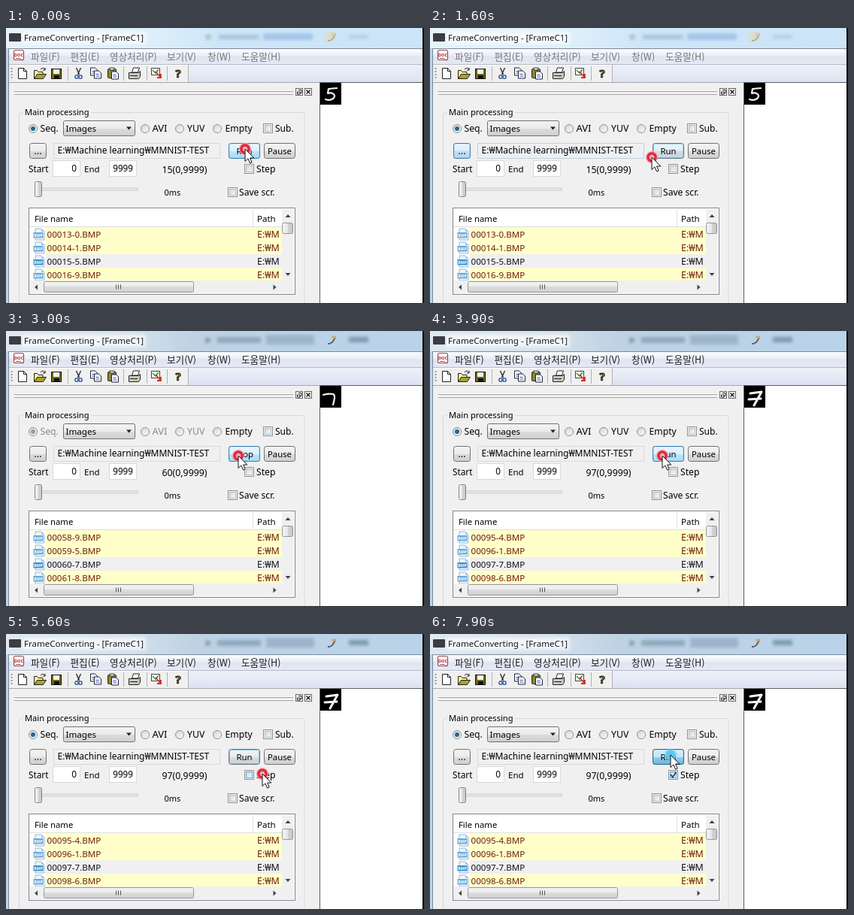
These frames come from a looping animation (556x366 px, 8000 ms). An HTML page:

```html
<!DOCTYPE html>
<html lang="ko">
<head>
<meta charset="utf-8">
<title>Frame viewer</title>
<style>
html, body { margin: 0; width: 100%; height: 100%; overflow: hidden; background: #f0f0f0; }
svg { display: block; width: 556px; height: 366px; }
text { font-family: "Noto Sans", "Open Sans", sans-serif; white-space: pre; }
.menu text { font-family: "Noto Sans CJK KR", "Noto Sans CJK", sans-serif; font-size: 12.6px; }
</style>
</head>
<body>
<svg id="stage" viewBox="0 0 556 366" xmlns="http://www.w3.org/2000/svg"></svg>
<script>
const LOOP = 8000, STEP = 100, RUN_START = 2000, RUN_END = 3800, FIRST = 15, LAST = 97;

// Class of each sample, in file order
const labels = '7210414959069015973496654074013134727121174235124463556041957893746430702917329776278473613693141769';

// Handwritten digits inside a 28 x 28 cell
const digitPaths = [
  'M15 6C6 6 5 22 13 22S23 6 14 6',
  'M16 6L12 22',
  'M8 9C11 4 20 6 17 12L8 21Q13 17 21 21',
  'M8 8C14 4 20 7 17 11L12 13C21 13 20 22 9 21',
  'M9 7L8 14Q14 16 19 12M19 6L17 23',
  'M22 6L11 7L10 13C17 11 22 16 17 20Q13 23 7 21',
  'M16 5C8 10 7 22 13 22S19 14 9 17',
  'M4 11Q11 9 17 10Q21 11 17 24',
  'M18 8C11 3 7 9 13 13S17 23 12 22S12 16 19 8',
  'M19 9C13 4 6 12 11 14S18 12 19 8L16 23'
];
const crossedSeven = 'M8 9L23 7L13 25M6 17L22 16';

// Pointer route: time, x, y
const route = [
  [0, 318, 161], [1000, 318, 161], [1350, 46, 167], [1600, 295, 172], [1900, 309, 166],
  [4600, 309, 166], [5000, 328, 178], [5400, 341, 186], [6000, 341, 186], [6200, 352, 169],
  [6400, 352, 169], [6600, 341, 180], [6900, 326, 187], [7300, 326, 187], [7700, 320, 161], [8000, 320, 161]
];
const clicks = [[1900, 2000], [3700, 3800], [7000, 7200], [7800, 8000]];
const hovers = {
  run: [[-500, 1050], [1750, 4800], [7500, 9000]],
  dots: [[1280, 1420]],
  path: [[1120, 1280], [1420, 1580]],
  pause: [[6100, 6500]],
  step: [[5200, 6100], [6500, 7450]]
};

const rect = (x, y, w, h, fill, extra = '') =>
  `<rect x="${x}" y="${y}" width="${w}" height="${h}" fill="${fill}" ${extra}/>`;
const line = (d, color, width = 1, extra = '') =>
  `<path d="${d}" fill="none" stroke="${color}" stroke-width="${width}" ${extra}/>`;
const shape = (d, fill, extra = '') => `<path d="${d}" fill="${fill}" ${extra}/>`;
const text = (x, y, s, size = 11.5, extra = '') =>
  `<text x="${x}" y="${y}" font-size="${size}" ${extra}>${s}</text>`;
const stopTags = stops => stops.map(([o, c, a = 1]) => `<stop offset="${o}" stop-color="${c}" stop-opacity="${a}"/>`).join('');
const gradient = (id, stops, dir = 'x2="0" y2="1"') =>
  `<linearGradient id="${id}" ${dir}>${stopTags(stops)}</linearGradient>`;
const radial = (id, stops) => `<radialGradient id="${id}">${stopTags(stops)}</radialGradient>`;

const button = (id, x, w, label, size) => `
  ${rect(x + .5, 153.5, w - 1, 20, 'url(#face)', 'rx="3" stroke="#707070"')}
  ${rect(x + .5, 153.5, w - 1, 20, 'url(#hot)', `id="${id}Glow" rx="3" stroke="#3c7fb1"`)}
  ${rect(x + 1.5, 154.5, w - 3, 18, 'none', `id="${id}Ring" rx="2" stroke="#6cc4e8"`)}
  ${text(x + w / 2, 168, label, size, `id="${id}Label" text-anchor="middle"`)}`;

const radio = (x, id, on) => `
  <circle cx="${x}" cy="134" r="5.5" fill="url(#bulb)" stroke="#8e8f8f"/>
  ${on ? `<circle id="${id}" cx="${x}" cy="134" r="3" fill="#1c6a9c"/>` : ''}`;

const checkbox = (x, y, id = 'box' + x) => `
  ${rect(x + .5, y + .5, 12, 12, '#f6f6f6', 'stroke="#8e8f8f"')}
  ${rect(x + 2.5, y + 2.5, 8, 8, 'url(#bulb)', `id="${id}" stroke="#b6bcc2"`)}`;

const field = (x, y, w, h, fill) => rect(x + .5, y + .5, w - 1, h - 1, fill, 'stroke="#d5d9de"');

const fileRow = n => {
  const y = 265 + n * 18, current = n === 2;
  return `${rect(53, y, 314, 18, current ? '#f0eff1' : '#ffffc9')}
    ${shape(`M39 ${y + 2}h8l4 4v11h-12z`, '#eef5fb', 'stroke="#7fa9c9" stroke-width=".8"')}
    ${shape(`M47 ${y + 2}v4h4z`, '#a5c8e0')}
    ${rect(36.5, y + 7, 13, 7.5, current ? '#3f8fc7' : '#6ba8d4')}
    ${text(43, y + 13, 'BMP', 5.2, 'fill="#fff" font-weight="700" text-anchor="middle"')}
    <g fill="${current ? '#111' : '#6e1c0c'}">
      ${text(54.5, y + 14, '', 11.6, `id="file${n}"`)}
      ${text(334, y + 14, 'E:₩M', 12.4, 'clip-path="url(#listClip)"')}
    </g>`;
};

const menuItems = [[33, '파일(F)'], [85.5, '편집(E)'], [138, '영상처리(P)'], [214, '보기(V)'], [268, '창(W)'], [313, '도움말(H)']];

const defs = `<defs>
  ${gradient('titleIdle', [[0, '#e6f3fb'], [.35, '#ddeffa'], [.5, '#cfe6f8'], [1, '#cbe4f7']], '')}
  ${gradient('titleLive', [[0, '#dfe9f1'], [.3, '#d3e0eb'], [.45, '#bed2e3'], [1, '#b9d3ea']], '')}
  ${gradient('menuBar', [[0, '#fbfcfe'], [.45, '#e9eef6'], [.5, '#dfe5f1'], [1, '#e4e9f4']])}
  ${gradient('toolStrip', [[0, '#eef1f9'], [1, '#dbe2f0']])}
  ${gradient('face', [[0, '#f3f3f3'], [.5, '#ebebeb'], [.5, '#dddddd'], [1, '#cfcfcf']])}
  ${gradient('hot', [[0, '#eaf6fd'], [.5, '#d9f0fc'], [.5, '#bee6fd'], [1, '#a7d9f5']])}
  ${gradient('down', [[0, '#d8edf8'], [.5, '#c4e5f6'], [.5, '#98d1ef'], [1, '#68b3db']])}
  ${gradient('bulb', [[0, '#d2d6da'], [1, '#fafafa']], 'x2="1" y2="1"')}
  ${gradient('thumbV', [[0, '#f5f5f5'], [.5, '#e6e6e8'], [.5, '#d4d5d7'], [1, '#c4c5c8']], '')}
  ${radial('halo', [[0, '#ffd0d2'], [.3, '#f8a4a9'], [.45, '#e2203a'], [.7, '#e22c42'], [.82, '#f4a0a8', .8], [1, '#f8c0c4', 0]])}
  ${radial('press', [[0, '#4cc4ee'], [.7, '#5fcaf0', .9], [1, '#7fd8f5', .1]])}
  <filter id="soft" x="-20%" y="-60%" width="140%" height="220%"><feGaussianBlur stdDeviation="2.2"/></filter>
  <clipPath id="listClip"><rect x="31" y="241" width="335" height="96"/></clipPath>
  <clipPath id="titleClip"><rect width="554" height="27"/></clipPath>
</defs>`;

const pen = opacity => `<g opacity="${opacity}">${line('M428 17q6 1 10-9', '#3c3a38', 2)}${line('M433 8h6', '#d99a4e', 3)}</g>`;
const titleBar = `
  <g clip-path="url(#titleClip)">
    <g id="idleBar">${rect(0, 0, 556, 27, 'url(#titleIdle)')}
      <g filter="url(#soft)">
        <circle cx="269" cy="12" r="3.5" fill="#9cc0b8"/>${rect(283, 9, 54, 6, '#a9c3da')}
        ${rect(342, 7, 66, 9, '#a4c5e8')}${rect(456, 9, 26, 5, '#b3cfe8')}
        ${shape('M425 6h13v9l-6 3h-7z', '#dfdcc4')}
      </g>${pen(.3)}</g>
    <g id="liveBar">${rect(0, 0, 556, 27, 'url(#titleLive)')}
      <g filter="url(#soft)">
        ${shape('M266 8l7 4l-7 5z', '#6f8b9c')}${rect(281, 8, 58, 8, '#90a8bd')}
        ${rect(346, 5, 64, 13, '#9cb4ca')}${rect(456, 8, 26, 7, '#7f98ae')}
      </g>${pen(.75)}</g>
    <g filter="url(#soft)">${rect(22, 5, 164, 16, '#fff', 'opacity=".7"')}</g>
  </g>
  ${rect(4, 7, 16, 11, '#3b3d42', 'rx="1"')}
  ${text(24, 17, 'FrameConverting - [FrameC1]', 11.5, 'fill="#16181c"')}`;

const menuBar = `
  ${rect(4, 28, 550, 20, 'url(#menuBar)')}${rect(3, 27, 551, 1, '#7d8a9a')}
  ${rect(10.5, 29.5, 13, 13, '#fff', 'rx="2" stroke="#a8484c" stroke-width="1.2"')}
  ${text(17, 38, 'DOC', 5.5, 'font-weight="700" text-anchor="middle" fill="#a01c22"')}
  ${line('M13 40.5h6l3 3', '#a8484c')}
  <g class="menu" id="menu">${menuItems.map(([x, s]) => `<text x="${x}" y="42.5">${s}</text>`).join('')}</g>`;

const pages = (dx, dy) => `<g transform="translate(${dx} ${dy})">
  ${shape('M112.5 53h6l3 3v7h-9z', '#fff', 'stroke="#223"')}${line('M114.5 57.5h4M114.5 60h5', '#35c')}</g>`;
const toolBar = `
  ${rect(4, 48, 550, 25, 'url(#toolStrip)')}${rect(4, 48, 238, 24, '#f0f0f0')}
  ${rect(4, 48, 550, 1, '#b4bac4')}${rect(4, 49, 238, 1, '#fff')}${rect(4, 72, 414, 1, '#a5a8ad')}
  ${line('M7.5 53v16', '#999', 2, 'stroke-dasharray="2 2"')}
  ${line('M82.5 51v19M156.5 51v19M187.5 51v19M214.5 51v19M242.5 49v23', '#aeb1b6')}
  ${shape('M16.5 53.5h7l4 4v10h-11z', '#fff', 'stroke="#222"')}${line('M23.5 53.5v4h4', '#222')}
  ${shape('M37.5 67.5v-11h4l1.5 2h6v3h-7z', '#fff6a0', 'stroke="#222"')}
  ${shape('M37.5 67.5l4-6h12l-4 6z', '#a8a32c', 'stroke="#222"')}${line('M46 55q4-4 6 1m0-3v3h-3', '#222')}
  ${rect(60.5, 54.5, 13, 13, '#6c6a18', 'stroke="#111"')}${rect(63, 55, 8, 6, '#f3f3f3')}${rect(64, 63, 7, 5, '#111')}
  ${line('M93.5 53l4 9M99.5 53l-4 9', '#222', 1.3)}
  ${[94, 99].map(x => `<circle cx="${x}" cy="65" r="2.2" fill="none" stroke="#224a9c" stroke-width="1.3"/>`).join('')}
  ${pages(0, 0)}${pages(5, 4)}
  ${rect(135.5, 54.5, 11, 12, '#8d8437', 'rx="1" stroke="#222"')}${rect(138, 53, 6, 3, '#ddd', 'stroke="#222" stroke-width=".8"')}
  ${pages(28, 5)}
  ${shape('M167.5 59l2-6h8l-2 6z', '#fff', 'stroke="#222"')}${shape('M163.5 59.5h13l2-2v7l-2 3h-13z', '#c9c9c9', 'stroke="#222"')}
  ${line('M165 63.5h10', '#222')}${rect(171, 64.5, 3, 1.5, '#d8c020')}
  ${rect(193.5, 53.5, 11, 9, '#fff', 'stroke="#444"')}${line('M195 56l4 4 4-5', '#2a9a3c', 1.6)}
  ${line('M199 58l7 8m0-5v5h-5', '#d82a22', 1.8)}
  ${text(229, 66, '?', 15, 'font-weight="800" text-anchor="middle" fill="#8c8420" stroke="#111" stroke-width=".9"')}`;

const panel = `
  ${rect(4, 73, 413, 293, '#f0f0f0')}${rect(418, 73, 136, 293, '#fff')}
  ${line('M417.5 366V72.5H554', '#5c5f64')}
  ${[83, 87].map(y => rect(11, y, 371, 1, '#fff') + rect(11, y + 1, 371, 1, '#a0a0a0')).join('')}
  ${rect(385.5, 80.5, 9, 9, '#f4f4f4', 'stroke="#666"')}${line('M389 82.5h4v4h-2M387.5 85h3.5v3h-3.5z', '#222')}
  ${rect(397.5, 80.5, 9, 9, '#f4f4f4', 'stroke="#666"')}${line('M399.5 82.5l5 5m0-5l-5 5', '#111', 1.3)}
  ${line('M22 112.5h-2.500q-2 0-2 2v252M113 112.5h282q2 0 2 2v252', '#d5dadd')}
  ${text(25, 116, 'Main processing', 11.1)}`;

const controls = `
  ${radio(36, 'seqDot', true)}${radio(185)}${radio(231)}${radio(281)}${checkbox(342, 127)}
  <g id="modeText">${text(45.5, 138, 'Seq.', 12.2)}${text(194.5, 138, 'AVI', 13)}${text(241, 138, 'YUV', 12.3)}</g>
  ${text(291.5, 138, 'Empty', 12.2)}${text(358, 138, 'Sub.', 12)}
  ${rect(76.5, 123.5, 95, 20, 'url(#face)', 'rx="2" stroke="#707070"')}
  ${text(79.5, 138, 'Images', 11.6)}${shape('M160 131.5h7l-3.5 4z', '#222')}
  ${field(63, 153, 222, 21, '#f0f0f0')}${rect(63.5, 153.5, 221, 20, '#e8f3fb', 'id="pathGlow" stroke="#8cc0e0"')}
  ${text(68.5, 167, 'E:₩Machine learning₩MMNIST-TEST', 12)}
  ${button('dots', 31, 23, '...', 13)}${button('run', 296, 42, 'Run', 11.4)}${button('pause', 343, 42, 'Pause', 11.3)}
  ${text(30, 192, 'Start', 11.8)}${field(62, 176, 37, 22, '#fff')}${text(94, 191, '0', 11.8, 'text-anchor="end"')}
  ${text(104, 192, 'End', 11.5)}${field(137, 176, 37, 22, '#fff')}${text(169, 191, '9999', 11.7, 'text-anchor="end"')}
  ${text(237.5, 192.5, '', 12.3, 'id="counter" text-anchor="middle"')}
  ${checkbox(317, 181, 'stepBox')}${line('M320 187l3 3.5 4.5-7', '#2a4f90', 2, 'id="stepMark"')}${text(333, 192, 'Step', 12.2)}
  ${rect(45, 213, 130, 3, '#e7eaea', 'stroke="#c2c4c6" stroke-width=".8"')}
  ${rect(38.5, 204.5, 9, 20, 'url(#thumbV)', 'rx="2" stroke="#858688"')}
  ${text(210.5, 222.5, '0ms', 11)}${checkbox(295, 212)}${text(310, 222.5, 'Save scr.', 12.1)}`;

const list = `
  ${rect(30.5, 239.5, 354, 115, '#fff', 'stroke="#828790"')}
  ${rect(328, 242, 1, 22, '#dfe1e5')}${rect(31, 264, 336, 1, '#dcdee2')}
  ${text(38, 258, 'File name', 11.3)}${text(334, 258, 'Path', 11.5)}
  ${[0, 1, 2, 3].map(fileRow).join('')}
  ${rect(367, 241, 16, 95, '#f0f0f0')}${rect(31, 336, 352, 17, '#f0f0f0')}
  ${rect(367.5, 259.5, 14, 14, 'url(#thumbV)', 'rx="2" stroke="#979797"')}
  ${shape('M371.5 252h7l-3.5-4zM371.5 326h7l-3.5 4zM42 341.5v7l-4-3.5zM355.5 341.5v7l4-3.5z', '#444')}
  ${rect(50.5, 337.5, 199, 14, 'url(#face)', 'rx="2" stroke="#979797"')}
  ${line('M146.5 341.5v6M149.5 341.5v6M152.5 341.5v6', '#555')}`;

const overlay = `
  ${rect(418, 73, 28, 29, '#000')}
  ${line('', '#f4f4f4', 2, 'id="digit" transform="translate(418 74)" stroke-linecap="round" stroke-linejoin="round"')}
  ${rect(0, 27, 3, 339, '#bfd4e8')}${rect(3, 27, 1, 339, '#77879a')}${rect(554, 0, 2, 366, '#000')}
  <g id="pointer"><circle id="spot" r="9"/>
    ${shape('M0 0V16.5L3.9 12.9L6.6 19L9.2 17.9L6.6 12H11.8Z', '#fff', 'stroke="#111"')}</g>`;

document.getElementById('stage').innerHTML =
  defs + rect(0, 0, 556, 366, '#f0f0f0') + titleBar + menuBar + toolBar + panel + controls + list + overlay;

const el = id => document.getElementById(id);
const set = (id, name, value) => el(id).setAttribute(name, value);
const clamp = v => Math.max(0, Math.min(1, v));
const within = (spans, t) => spans.some(([a, b]) => t >= a && t < b);

// Quick fade in, slow fade out
const glow = (name, t) => Math.max(...hovers[name].map(([a, b]) =>
  t < a ? 0 : t < b ? clamp((t - a) / 200) : clamp(1 - (t - b) / 800)));

function pointerAt(t) {
  const i = Math.max(1, route.findIndex(p => p[0] > t));
  const [a, b] = [route[i - 1], route[i]];
  const u = (t - a[0]) / (b[0] - a[0]), e = u * u * (3 - 2 * u);
  return [a[1] + (b[1] - a[1]) * e, a[2] + (b[2] - a[2]) * e];
}

function render(t) {
  const live = t >= 1900, running = t >= RUN_START && t < RUN_END;
  const progress = clamp((t - RUN_START) / (RUN_END - RUN_START));
  const index = FIRST + Math.floor(progress * (LAST - FIRST));
  const pressed = within(clicks, t);

  set('idleBar', 'opacity', live ? 0 : 1);
  set('liveBar', 'opacity', live ? 1 : 0);
  set('menu', 'fill', live ? '#1c1e22' : '#74777c');

  el('counter').textContent = `${index}(0,9999)`;
  for (let n = 0; n < 4; n++) {
    const k = index - 2 + n;
    el('file' + n).textContent = `${String(k).padStart(5, '0')}-${labels[k]}.BMP`;
  }
  const last = index === LAST;
  set('digit', 'd', last ? crossedSeven : digitPaths[labels[index]]);
  set('digit', 'stroke-width', last ? 3 : 2.2);

  el('runLabel').textContent = running ? 'Stop' : 'Run';
  set('modeText', 'fill', running ? '#8a8a8a' : '#000');
  set('seqDot', 'fill', running ? '#9a9da0' : '#1c6a9c');

  const pulse = .2 - .2 * Math.cos(t / 1000 * Math.PI);
  const runDown = pressed && t > 7400;
  for (const id of ['dots', 'run', 'pause']) {
    const level = glow(id, t), isDefault = id === 'run';
    set(id + 'Glow', 'opacity', isDefault ? Math.max(level, pulse) : level);
    set(id + 'Ring', 'opacity', isDefault ? .8 - .6 * level : level * .3);
  }
  set('runGlow', 'fill', runDown ? 'url(#down)' : 'url(#hot)');
  set('runGlow', 'stroke', runDown ? '#2c628b' : '#3c7fb1');
  set('pathGlow', 'opacity', glow('path', t) * .3);
  set('stepBox', 'stroke', glow('step', t) > .3 ? '#4aa8dc' : '#b6bcc2');
  set('stepMark', 'opacity', t >= 7200 ? 1 : 0);

  set('pointer', 'transform', `translate(${pointerAt(t)})`);
  set('spot', 'fill', pressed ? 'url(#press)' : 'url(#halo)');
}

const start = performance.now();
function tick(now) {
  const t = Math.max(0, now - start) % LOOP;
  render(Math.floor(t / STEP) * STEP);
  requestAnimationFrame(tick);
}
render(0);
requestAnimationFrame(tick);
</script>
</body>
</html>
```
